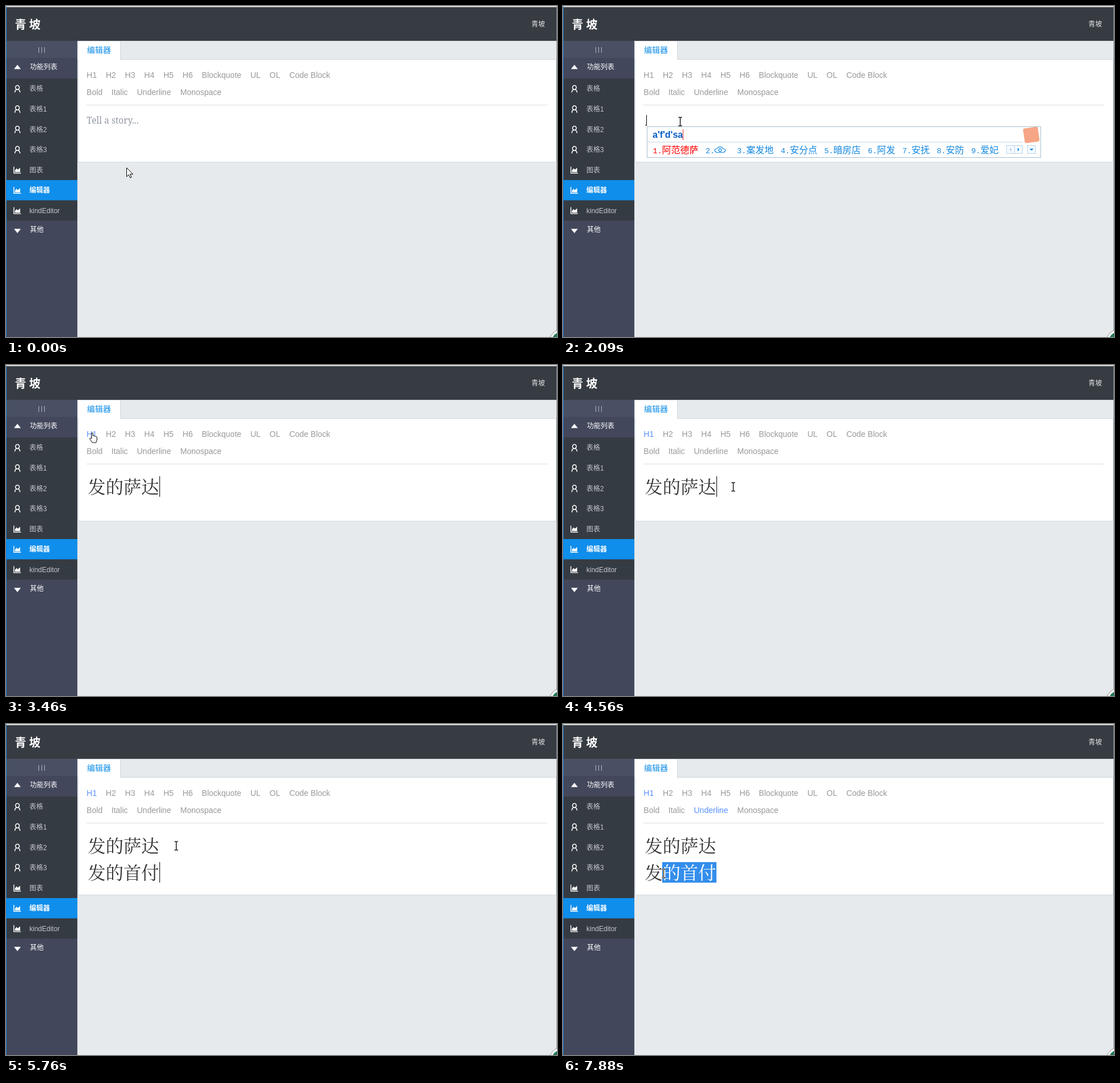
An HTML page that plays this animation: 966x580 px, repeating every 8 s.

```html
<!DOCTYPE html>
<html lang="zh-CN">
<head>
<meta charset="utf-8">
<title>编辑器</title>
<style>
html, body { margin: 0; width: 100%; height: 100%; overflow: hidden; background: #e6eaed; }
svg { display: block; width: 966px; height: 580px; font: 12px "Liberation Sans", "Noto Sans CJK SC", sans-serif; }
text { white-space: pre; }
.tool { font-size: 14px; fill: #999; }
.tool.on { fill: #5890ff; }
.doc { font-family: "Noto Serif CJK SC", "Noto Sans CJK SC", serif; font-weight: 200; fill: #333; }
.big { font-size: 31.2px; }
.small { font-size: 16px; fill: #444; }
.pick { font: 16px "Noto Sans CJK SC", sans-serif; font-weight: 300; }
.num { font: 13.33px "Liberation Mono", monospace; }
.typed { font: bold 16px "Liberation Sans", sans-serif; fill: #0a5cc4; }
</style>
</head>
<body>
<svg id="stage" viewBox="0 0 966 580"></svg>
<script>
const LOOP = 8000;
const stage = document.getElementById('stage');

function el(parent, tag, attrs = {}, text) {
  const node = document.createElementNS('http://www.w3.org/2000/svg', tag);
  for (const k in attrs) node.setAttribute(k, attrs[k]);
  if (text !== undefined) node.textContent = text;
  parent.append(node);
  return node;
}
const rect = (x, y, width, height, fill, p = stage) => el(p, 'rect', { x, y, width, height, fill });
const label = (x, y, text, attrs = {}, p = stage) => el(p, 'text', { x, y, ...attrs }, text);
const path = (d, attrs = {}, p = stage) => el(p, 'path', { d, ...attrs });
const group = (attrs = {}, p = stage) => el(p, 'g', attrs);
const show = (node, on) => node.setAttribute('visibility', on ? 'visible' : 'hidden');
const move = (node, x, y) => node.setAttribute('transform', `translate(${x} ${y})`);

// Page frame, header and tabs
const EDGE = '#d3d9dd';
rect(0, 0, 966, 580, '#e6eaed');
rect(1, 1, 964, 60, '#373c43');
label(15.5, 39.5, '青坡', { 'font-size': 20, 'font-weight': 700, 'letter-spacing': 5, fill: '#fff' });
label(921, 35.5, '青坡', { fill: '#e3e5e8' });
rect(125, 61, 840, 1, EDGE);
rect(125, 61, 1, 519, EDGE);
rect(126, 62, 75, 31, EDGE);
rect(126, 62, 74, 32, '#fff');
rect(200, 93, 765, 1, '#ccd3d8');
label(142, 82, '编辑器', { 'font-size': 14, fill: '#108ee9' });

// Sidebar
rect(1, 61, 124, 519, '#42475b');
rect(1, 61, 124, 30, '#4a5064');
for (const x of [57, 62, 67]) rect(x, 72, 1, 10, '#b4b8c4');
rect(1, 127, 124, 249, '#353b42');
rect(1, 305, 124, 35.5, '#108eeb');
path('M14 110.5L20 103L26 110.5ZM14 390.5H26L20 398Z', { fill: '#fff' });
label(42, 110.5, '功能列表', { fill: '#fff' });
label(42, 396, '其他', { fill: '#fff' });
['表格', '表格1', '表格2', '表格3', '图表', '编辑器', 'kindEditor'].forEach((name, i) => {
  const y = 145 + i * 35.6;
  const active = i === 5;
  label(41, y + 4.4, name, { fill: active ? '#fff' : '#c3c6cb', 'font-weight': active ? 700 : 400 });
  const icon = group({ transform: `translate(20 ${y})` });
  if (i < 4) {
    path('M-3.4 -2.2A3.4 3.6 0 1 1 3.4 -2.2A3.4 3.6 0 1 1 -3.4 -2.2M-4.6 6.5C-4.4 3.4 -3 1.8 -1 1.2M4.6 6.5C4.4 3.4 3 1.8 1 1.2',
      { fill: 'none', stroke: '#fff', 'stroke-width': 1.5 }, icon);
  } else {
    path('M-6.2 -6V5.3H6.2', { fill: 'none', stroke: '#fff', 'stroke-width': 1.4 }, icon);
    path('M-4.3 3.6V0.5L-1.5 -2.8L0.8 -0.6L4.8 -4V3.6Z', { fill: '#fff' }, icon);
  }
});

// Editor panel
const panelEdge = rect(126, 94, 839, 180, EDGE);
const panel = rect(127, 94, 837, 179, '#fff');
const tools = {};
const addTools = (y, list) => list.forEach(([x, name]) => {
  tools[name] = label(x, y, name, { class: 'tool' });
});
addTools(126, [[141.3, 'H1'], [175, 'H2'], [208.6, 'H3'], [242.3, 'H4'], [276, 'H5'], [309.6, 'H6'],
  [343.3, 'Blockquote'], [428.5, 'UL'], [462, 'OL'], [496.7, 'Code Block']]);
addTools(155.5, [[141.3, 'Bold'], [184.8, 'Italic'], [229.5, 'Underline'], [305.5, 'Monospace']]);
rect(141, 173, 808, 1, '#ddd');

const hint = label(141.5, 206, 'Tell a story...', { 'font-family': '"Noto Serif", serif', 'font-size': 15.5 });
const small = label(142.5, 206.5, '发的萨达', { class: 'doc small' });
const line1 = label(143.5, 224.5, '发的萨达', { class: 'doc big' });
const selection = rect(0, 242, 0, 36, '#338eeb');
const line2 = label(143.5, 272, '', { class: 'doc big' });
const glyphs = [...'发的首付'].map(c => el(line2, 'tspan', {}, c));
const caret = rect(0, 0, 1, 0, '#000');

// Input method popup, sized by its candidates
function makeIme(x, y, typed, words) {
  const g = group({ transform: `translate(${x} ${y})` });
  const frame = rect(0.5, 0.5, 0, 54, '#fff', g);
  const rule = rect(1, 27, 0, 1, '#c9d5de', g);
  label(10, 20, typed, { class: 'typed' }, g);
  const typedWidth = [...typed].reduce((w, c) => w + ({ "'": 3.8, f: 5.33, d: 9.77, h: 9.77 }[c] || 8.9), 0);
  rect(Math.round(10 + typedWidth), 5, 1, 19, '#e03030', g);
  let px = 10.5;
  words.split(' ').forEach((word, i) => {
    const fill = i ? '#1188e0' : '#f00';
    const t = label(px, 46.5, '', { fill, class: 'pick' }, g);
    el(t, 'tspan', { class: 'num' }, i + 1 + '.');
    if (word === '~') {
      const cloud = group({ transform: `translate(${px + 25.5} 41)`, fill: 'none', stroke: fill, 'stroke-width': 1.2 }, g);
      path('M-5 4.5C-11 4 -10.5 -2 -5.5 -2C-3.5 -6.5 4 -6 5 -2C10.5 -2 10.5 4 5 4.5Z', {}, cloud);
      el(cloud, 'circle', { cx: 0, cy: 0.5, r: 2.4 });
      px += 43;
    } else {
      const latin = /^[a-z]/.test(word);
      el(t, 'tspan', latin ? { class: 'num' } : {}, word);
      px += 16 + word.length * (latin ? 8 : 16);
    }
    px += 12.4;
  });
  const w = Math.round(px - 12.4 + 73);
  frame.setAttribute('width', w);
  frame.setAttribute('stroke', '#a5bfd1');
  rule.setAttribute('width', w - 32);
  el(g, 'rect', { x: w - 29, y: 2, width: 26, height: 26, rx: 3, fill: '#f6a585', transform: `rotate(-8 ${w - 16} 15)` });
  const arrows = [[60, 'M9 4.5V10.5L6 7.5Z', '#a8c8e4'], [46, 'M6 4.5V10.5L9 7.5Z', '#1188e0'], [23, 'M4 6H11L7.5 9.5Z', '#1188e0']];
  for (const [dx, d, fill] of arrows) {
    const b = group({ transform: `translate(${w - dx} 33)` }, g);
    el(b, 'rect', { x: 0.5, y: 0.5, width: 14, height: 14, fill: '#f5faff', stroke: '#b9d3e8' });
    path(d, { fill }, b);
  }
  return g;
}
const imes = [
  [147, 211, 'a', '爱上当然 ~ 阿姨好 爱上了 安全感 按时间 暗地里 安静些 岸边上'],
  [147, 211, "a'f'd'sa", '阿范德萨 ~ 案发地 安分点 暗房店 阿发 安抚 安防 爱妃'],
  [147, 211, "a'f'd'sa'f'd", '阿范德萨 ~ 案发地 安分点 暗房店 安放好 按分到 暗访的 爱犯懒'],
  [151, 263, 'fa', '发 法 罚 伐 fa 阀 乏 筏 髪'],
  [151, 263, "fa'd'sh", '发的时候 ~ 发电设施 法定时间 发达社会 发的是 发到手 法的书 发动时'],
  [151, 263, "fa'd'sh'f", '发的首付 ~ 发的身份 法定身份 发达省份 发的是 发到手 法的书 发动时']
].map(args => makeIme(...args));
const marks = [rect(144, 208, 1.5, 1.5, '#333'), rect(144, 276.5, 5, 1, '#222')];

// Window edges and floating badge
rect(0, 0, 966, 1, '#c4c4c2');
rect(0, 1, 966, 1, '#f4f4f2');
rect(0, 1, 1, 579, '#1a82d6');
rect(965, 1, 1, 579, '#8d949b');
el(stage, 'circle', { cx: 976, cy: 590, r: 24, fill: '#fff', stroke: '#8a8a8a' });
el(stage, 'circle', { cx: 976, cy: 590, r: 20, fill: '#1f7a55' });

// Mouse pointers
const pointers = { arrow: group(), beam: group({ style: 'mix-blend-mode:difference' }), hand: group() };
path('M0.5 0.5V16L4.2 12.6L6.7 18L9 17L6.6 11.7H11.5Z', { fill: '#fff', stroke: '#000' }, pointers.arrow);
path('M-3 -7.5H-1M1 -7.5H3M-1 -7.5L0 -7L1 -7.5M0 -7V7M-3 7.5H-1M1 7.5H3M-1 7.5L0 7L1 7.5',
  { fill: 'none', stroke: '#fff', 'stroke-width': 1.3 }, pointers.beam);
path('M4 11V1.5Q5.2 0 6.5 1.5V6Q8 5 9 6.6Q10.5 6 11.3 7.4Q13 7 13.5 8.8V13L11.8 18H5.5L1 12Q0.5 9.5 2.6 10Z',
  { fill: '#fff', stroke: '#000' }, pointers.hand);

// Each track lists [start, ...values]; a value holds until the next start
const tracks = {
  pointer: [[0, 'arrow', 211, 283], [400, 'beam', 205.5, 200], [550, 'beam', 205.5, 196], [830, 'beam', 205.5, 202.5],
    [2920, 'beam', 199.5, 184], [3040, 'arrow', 182, 149], [3190, 'arrow', 159, 125], [3340, 'hand', 146, 118],
    [3830, 'arrow', 163, 131], [3950, 'arrow', 214, 158], [4070, 'beam', 272.5, 203], [4190, 'beam', 298.5, 213.5],
    [5880, 'beam', 299.5, 214], [6030, 'beam', 302.5, 194], [6150, 'arrow', 295, 145], [6300, 'arrow', 290, 146],
    [6420, 'hand', 272, 147], [6540, 'hand', 262, 149], [7100, 'beam', 278.5, 183], [7250, 'beam', 269.5, 260],
    [7400, 'beam', 273.5, 270], [7520, 'beam', 266.5, 276], [7640, 'beam', 237.5, 268], [7760, 'beam', 206.5, 262],
    [7880, 'beam', 176.5, 262]],
  caret: [[0], [960, 143, 191, 19], [1540], [1820, 146, 191, 19], [2370], [2490, 207, 191, 19], [3040],
    [3460, 269, 195, 36], [4070], [4560, 269, 195, 36], [4810, 144, 242, 36], [5340, 150, 243, 20],
    [5760, 269, 242, 36], [6300], [6690, 269, 242, 36], [7250], [7400, 269, 242, 36], [7640]],
  ime: [[0, -1], [1940, 0], [2090, 1], [2220, 2], [2370, -1], [5340, 3], [5490, 4], [5610, 5], [5760, -1]],
  selected: [[0, 0], [7640, 1], [7760, 2], [7880, 3]]
};
const at = (name, t) => tracks[name].findLast(step => step[0] <= t).slice(1);

function draw(t) {
  const [kind, px, py] = at('pointer', t);
  for (const k in pointers) show(pointers[k], k === kind);
  move(pointers[kind], px, py);

  const [cx, cy, ch] = at('caret', t);
  show(caret, ch);
  if (ch) {
    caret.setAttribute('x', cx);
    caret.setAttribute('y', cy);
    caret.setAttribute('height', ch);
  }

  const [ime] = at('ime', t);
  imes.forEach((g, i) => show(g, i === ime));
  show(marks[0], ime >= 0 && ime < 3);
  show(marks[1], ime >= 3);

  const heading = t >= 3460;
  show(hint, t < 1820);
  hint.setAttribute('fill', t < 960 ? '#9197a3' : '#bdc1c9');
  show(small, t >= 2370 && !heading);
  show(line1, heading);
  show(line2, t >= 5760);
  tools.H1.classList.toggle('on', heading);
  tools.Underline.classList.toggle('on', t >= 6690);

  const height = t < 4810 ? 179 : 205;
  panel.setAttribute('height', height);
  panelEdge.setAttribute('height', height + 1);

  const [n] = at('selected', t);
  selection.setAttribute('x', 269 - n * 31.7);
  selection.setAttribute('width', n * 31.7);
  glyphs.forEach((g, i) => g.setAttribute('fill', i >= 4 - n ? '#fff' : '#333'));
}

const start = performance.now();
function tick() {
  draw((performance.now() - start) % LOOP);
  requestAnimationFrame(tick);
}
tick();
</script>
</body>
</html>
```
